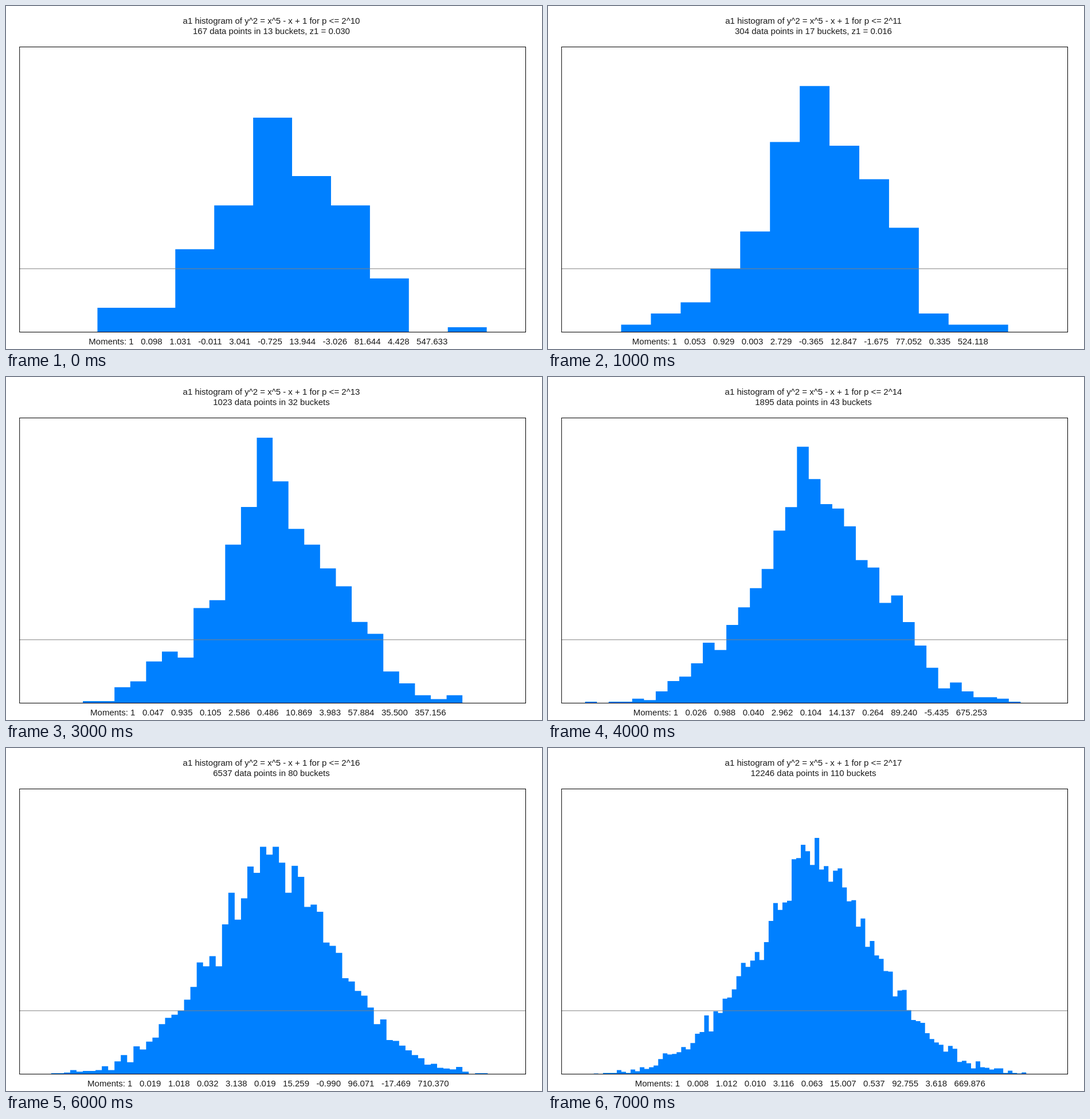
These frames come from a looping animation (935 by 599 pixels, 8000 ms). An HTML page:

```html
<!DOCTYPE html>
<html lang="en">
<head>
<meta charset="utf-8">
<title>a1 histogram</title>
<style>
  html, body { margin: 0; width: 100%; height: 100%; overflow: hidden; background: #fff; }
  svg { display: block; width: 935px; height: 599px; }
  text { font: 15px "Liberation Sans", Arial, sans-serif; fill: #1a1a1a; text-anchor: middle; white-space: pre; }
  .bars { fill: #0080ff; }
  .mean { stroke: #808080; }
  .frame { fill: none; stroke: #000; }
  .step { visibility: hidden; animation: show 8s step-end infinite; }
  @keyframes show {
    0% { visibility: visible; }
    12.5%, 100% { visibility: hidden; }
  }
</style>
</head>
<body>
<svg viewBox="0 0 935 599"></svg>
<script>
const LEFT = 23.7, WIDTH = 882.8, TOP = 71.5, BASE = 569.5, MEAN = 110.67;
const FIRST = 10, LAST = 17;
const BAD = [19, 151]; // primes of bad reduction
const svg = document.querySelector('svg');
const chi = new Int8Array(2 ** LAST + 2);

function add(parent, tag, attrs, text = '') {
  const el = document.createElementNS('http://www.w3.org/2000/svg', tag);
  for (const key in attrs) el.setAttribute(key, attrs[key]);
  el.textContent = text;
  return parent.appendChild(el);
}

function isPrime(n) {
  for (let d = 3; d * d <= n; d += 2) if (n % d === 0) return false;
  return true;
}

// Sum of the quadratic character of x^5 - x + 1 over all x mod p.
// g = x^5 - x is odd, so x and -x are handled together; g advances by differences.
function charSum(p) {
  const half = (p - 1) >> 1;
  chi.fill(-1, 1, p);
  for (let x = 1, sq = 0; x <= half; x++) {
    sq += 2 * x - 1;
    if (sq >= p) sq -= p;
    chi[sq] = 1;
  }
  chi[0] = chi[p] = 0;
  chi[p + 1] = 1;

  const e = 120 % p;
  let g = 0, a = 0, b = 30 % p, c = 150 % p, d = 240 % p, sum = 1;
  for (let x = 1; x <= half; x++) {
    g += a - p; g += p & (g >> 31);
    a += b - p; a += p & (a >> 31);
    b += c - p; b += p & (b >> 31);
    c += d - p; c += p & (c >> 31);
    d += e - p; d += p & (d >> 31);
    sum += chi[1 + g] + chi[p + 1 - g];
  }
  return sum;
}

function moment(values, k) {
  let sum = 0;
  for (const v of values) sum += v ** k;
  return (sum / values.length).toFixed(3);
}

function barPath(values, buckets) {
  const counts = new Array(buckets).fill(0);
  for (const v of values) counts[Math.floor((v + 4) * buckets / 8)]++;
  const w = WIDTH / buckets;
  return counts.map((c, i) => c
    ? `M${LEFT + i * w} ${BASE}v${-c * MEAN / buckets}h${w}V${BASE}z` : '').join('');
}

function addStep(exp, values) {
  const n = values.length;
  const buckets = Math.floor(Math.sqrt(n + 5));
  const zeros = values.filter(v => v === 0).length / n;
  const note = exp < 13 ? `, z1 = ${zeros.toFixed(3)}` : '';
  const stats = ['Moments: 1'];
  for (let k = 1; k <= 10; k++) stats.push(moment(values, k));

  const g = add(svg, 'g', { class: 'step', style: `animation-delay:${exp - FIRST}s` });
  add(g, 'path', { class: 'bars', d: barPath(values, buckets) });
  add(g, 'text', { x: 463, y: 31 }, `a1 histogram of y^2 = x^5 - x + 1 for p <= 2^${exp}`);
  add(g, 'text', { x: 463, y: 49 }, `${n} data points in ${buckets} buckets${note}`);
  add(g, 'text', { x: 457.3, y: 591 }, stats.join('\u00a0\u00a0\u00a0'));
}

const values = [];
for (let exp = FIRST, p = 7; exp <= LAST; exp++) {
  for (; p < 2 ** exp; p += 2) {
    if (isPrime(p) && !BAD.includes(p)) values.push(charSum(p) / Math.sqrt(p));
  }
  addStep(exp, values);
}
add(svg, 'path', { class: 'mean', d: `M${LEFT} ${BASE - MEAN}h${WIDTH}` });
add(svg, 'rect', { class: 'frame', x: LEFT, y: TOP, width: WIDTH, height: BASE - TOP });
</script>
</body>
</html>
```
